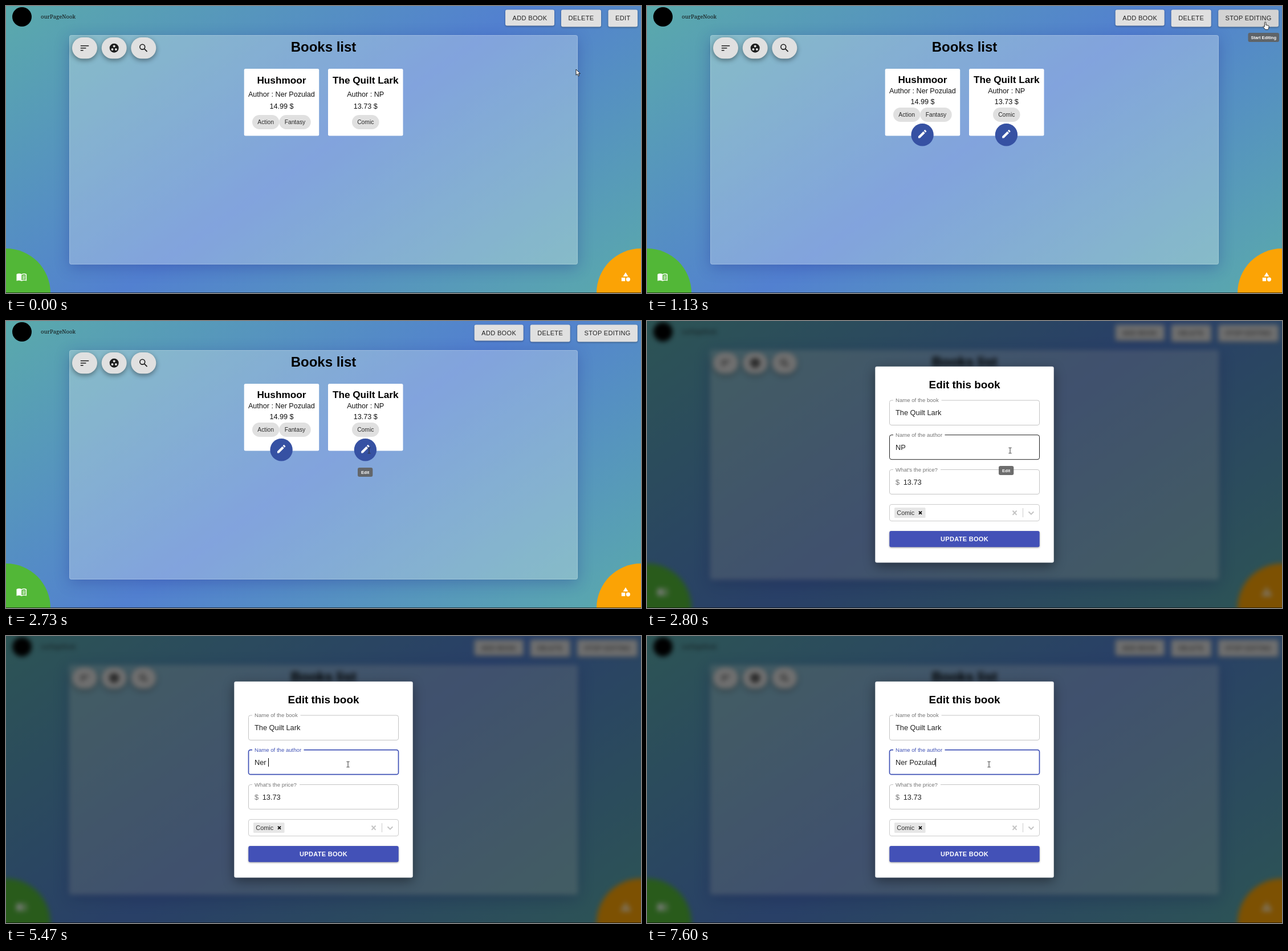
An HTML page for the animation above (8000 ms loop, 1114 by 503 pixels).

```html
<!DOCTYPE html>
<html lang="en">
<head>
<meta charset="utf-8">
<title>Book shelf</title>
<style>
html, body { margin: 0; width: 100%; height: 100%; overflow: hidden; }
#stage {
  position: relative; width: 1114px; height: 503px; overflow: hidden;
  background: linear-gradient(145deg, #5aaaab, #5280d0 50%, #5aaaab);
}
#page, #stage svg { position: absolute; left: 0; top: 0; width: 1114px; height: 503px; }
svg { overflow: visible; font-family: "Liberation Sans", Arial, sans-serif; }
text { white-space: pre; }
#panel {
  position: absolute; left: 111px; top: 50.5px; width: 892px; height: 402px; box-sizing: border-box;
  border: 1px solid rgba(255,255,255,.2); border-radius: 4px;
  background: rgba(255,255,255,.28); box-shadow: 0 6px 26px rgba(31,38,135,.3);
}
.raised { filter: drop-shadow(0 1.5px 1.5px rgba(0,0,0,.38)); }
.floating { filter: drop-shadow(0 3px 4px rgba(0,0,0,.4)); }
.sheet { filter: drop-shadow(0 6px 10px rgba(0,0,0,.4)); }
</style>
</head>
<body>
<div id="stage">
  <div id="page"><div id="panel"></div><svg id="shop"></svg></div>
  <svg id="front"></svg>
</div>
<script>
const NS = 'http://www.w3.org/2000/svg';
const LOOP = 8000, EDIT_AT = 1000, OPEN_AT = 2780, FOCUS_AT = 3470, SELECT_AT = 3800;
const BLUE = '#3f51b5';
const AUTHOR = 'Ner Pozulad', INITIALS = 'NP', BOOK = 'The Quilt Lark';
const byId = id => document.getElementById(id);

function el(parent, tag, attrs = {}, content) {
  const node = document.createElementNS(NS, tag);
  for (const key in attrs) node.setAttribute(key, attrs[key]);
  if (content !== undefined) node.textContent = content;
  parent.append(node);
  return node;
}
const group = (parent, attrs) => el(parent, 'g', attrs);
const rect = (parent, x, y, width, height, rx, fill, more) =>
  el(parent, 'rect', { x, y, width, height, rx, fill, ...more });
const circle = (parent, cx, cy, r, fill, more) => el(parent, 'circle', { cx, cy, r, fill, ...more });
const path = (parent, d, fill, more) => el(parent, 'path', { d, fill, ...more });
const line = (parent, d, stroke, width = 1) => path(parent, d, 'none', { stroke, 'stroke-width': width });
const label = (parent, x, y, size, content, more) =>
  el(parent, 'text', { x, y, 'font-size': size, fill: '#000', ...more }, content);
const centred = (parent, x, y, size, content, more) =>
  label(parent, x, y, size, content, { 'text-anchor': 'middle', ...more });
const bold = { 'font-weight': 700 };

// 24-unit icon grid centred on (x, y)
const icon = (parent, x, y, scale = .8) =>
  group(parent, { transform: `translate(${x} ${y}) scale(${scale}) translate(-12 -12)` });

function button(parent, x, y, w, h, content) {
  const face = rect(parent, x, y, w, h, 3, '#e0e0e0', { class: 'raised' });
  centred(parent, x + w / 2, 24.7, 11.05, content, { fill: '#212121', 'letter-spacing': .31 });
  return face;
}

function toolbar(parent, shift, last) {
  const g = group(parent);
  button(g, 876 - shift, 6.5, 86, 28, 'ADD BOOK');
  button(g, 974 - shift, 6.5, 70, 30, 'DELETE');
  return { g, last: button(g, 1056.5 - shift, 6.5, 51.5 + shift, 30, last) };
}

function tooltip(parent, x, y, w, content) {
  const g = group(parent);
  rect(g, x, y, w, 16, 3, 'rgba(97,97,97,.92)');
  centred(g, x + w / 2, y + 10.7, 7.5, content, { ...bold, fill: '#fff' });
  return g;
}

function card(parent, x, title, author, price, chips) {
  const mid = x + 65.7;
  rect(parent, x, 110, 131.5, 117.5, 2.5, '#fff');
  const name = centred(parent, mid, 0, 17.2, title, bold);
  const by = centred(parent, mid, 0, 12.6, 'Author : ' + author, { fill: '#111' });
  const cost = centred(parent, mid, 0, 12.6, price + ' $', { fill: '#111' });
  const tags = group(parent);
  for (const [left, w, content] of chips) {
    rect(tags, left, 0, w, 25, 12.5, '#e0e0e0');
    centred(tags, left + w / 2, 15.7, 10.3, content, { fill: '#2a2a2a' });
  }
  const pen = group(parent);
  circle(pen, mid - .3, 225.7, 19.7, '#3651a3');
  path(icon(pen, mid - .3, 224.3),
    'M3 17.25V21h3.75L17.81 9.94l-3.75-3.75zM20.71 7.04c.39-.39.39-1.02 0-1.41l-2.34-2.34c-.39-.39-1.02-.39-1.41 0l-1.83 1.83 3.75 3.75z', '#fff');
  return editing => {
    name.setAttribute('y', editing ? 134.5 : 136.3);
    by.setAttribute('y', editing ? 153.3 : 158.7);
    cost.setAttribute('y', editing ? 171.8 : 180.3);
    tags.setAttribute('transform', `translate(0 ${editing ? 178 : 191})`);
    show(pen, editing);
  };
}

function show(node, on) { node.style.display = on ? '' : 'none'; }

// Shop page
const shop = byId('shop');
circle(shop, 28, 19, 17, '#000');
label(shop, 61, 22.4, 9.5, 'ourPageNook', { 'font-family': '"Noto Serif", serif', fill: '#111' });
const idleBar = toolbar(shop, 0, 'EDIT');
const editBar = toolbar(shop, 54.3, 'STOP EDITING');
centred(shop, 557, 80.3, 24, 'Books list', bold);

for (const x of [116, 167.7, 219.3]) rect(shop, x, 55, 44, 37.3, 18.6, '#e0e0e0', { class: 'floating' });
path(icon(shop, 138, 73.7), 'M3 18h6v-2H3zM3 6v2h18V6zM3 13h12v-2H3z', '#1c1c1c');
const wheel = icon(shop, 189.7, 73.7);
circle(wheel, 12, 12, 10, '#1c1c1c');
for (const [x, y] of [[8, 15], [12, 8], [16, 15]]) circle(wheel, x, y, 2.5, '#e0e0e0');
const lens = icon(shop, 241.3, 73.7);
circle(lens, 9.5, 9.5, 5.5, 'none', { stroke: '#1c1c1c', 'stroke-width': 2 });
line(lens, 'M13.5 13.5L19.8 19.8', '#1c1c1c', 2.2);

const cards = [
  card(shop, 417.7, 'Hushmoor', AUTHOR, '14.99', [[432, 47.3, 'Action'], [479.2, 55.5, 'Fantasy']]),
  card(shop, 565, BOOK, INITIALS, '13.73', [[607, 47.5, 'Comic']])
];

circle(shop, 0, 503, 78, '#52b737');
circle(shop, 1114, 503, 78, '#fba305');
const book = icon(shop, 27.3, 474.7);
path(book, 'M12 6Q7 3 1 6V20.8Q7 18.5 12 21.5Q17 18.5 23 20.8V6Q17 3 12 6zM12 8Q17 5.3 21 7V18.5Q16 17.3 12 19.5z', '#fff', { 'fill-rule': 'evenodd' });
for (const y of [10, 12.7, 15.4]) line(book, `M14 ${y + .6}Q17 ${y - .8} 19.5 ${y - .2}`, '#fff', 1.4);
const shapes = icon(shop, 1087, 474.7);
path(shapes, 'M12 2L6.5 11h11zM3 13.5h8v8H3z', '#fff');
circle(shapes, 17.5, 17.5, 4.5, '#fff');

// Dialog
const front = byId('front');
const startTip = tooltip(front, 1054.5, 47, 54.5, 'Start Editing');
const dialog = group(front);
rect(dialog, 0, 0, 1114, 503, 0, 'rgba(0,0,0,.5)');
rect(dialog, 400.3, 79.7, 313.4, 343.8, 3, '#fff', { class: 'sheet' });
centred(dialog, 557, 117.5, 18.9, 'Edit this book', bold);

function field(y, h, title, notch) {
  const frame = rect(dialog, 425.5, y, 263, h, 3.5, 'none', { stroke: '#c4c4c4' });
  rect(dialog, 432, y - 2, notch, 4, 0, '#fff');
  return { frame, title: label(dialog, 436, y + 3, 9.6, title, { fill: '#757575' }) };
}
const value = (x, y, content, fill = '#212121') => label(dialog, x, y, 12.8, content, { fill });

field(139, 43.5, 'Name of the book', 84.5);
value(436, 165, BOOK);
const authorField = field(199.7, 43, 'Name of the author', 90.5);
field(260.5, 43, "What's the price?", 83);
value(436, 287, '$', '#777');
value(449.7, 287, '13.73');

const pick = rect(dialog, 436, 214, 18, 15, 0, '#3390ff');
const typed = value(436, 226, INITIALS);
const caret = rect(dialog, 0, 214, 1, 15, 0, '#000');

rect(dialog, 425.5, 321.5, 263, 29, 3.5, 'none', { stroke: '#ccc' });
rect(dialog, 434, 327, 54.5, 18, 1.5, '#e6e6e6');
label(dialog, 438.3, 340, 10.9, 'Comic', { fill: '#333' });
line(dialog, 'M477 333.7l5 5m0-5l-5 5', '#000', 1.7);
line(dialog, 'M641.5 332.5l7 7.4m0-7.4l-7 7.4', '#c4c4c4', 2);
line(dialog, 'M659.5 328v16', '#ccc');
line(dialog, 'M669.5 334.3l4.4 4.4 4.4-4.4', '#c4c4c4', 2);
rect(dialog, 425.3, 368, 263.4, 28.3, 3, '#4351b7', { class: 'raised' });
centred(dialog, 557, 386, 11, 'UPDATE BOOK', { ...bold, fill: '#fff', 'letter-spacing': .31 });

const editTip = tooltip(front, 617, 257, 26.3, 'Edit');
rect(front, 0, 502, 1114, 1, 0, 'rgba(0,0,0,.6)');

// Pointer
const pointer = group(front);
const outline = { stroke: '#111', 'stroke-width': .9, 'stroke-linejoin': 'round' };
const pointers = {
  arrow: path(pointer, 'M0 0V10.2L2.4 8.1 4 11.8 5.7 11 4.1 7.4H7.3z', '#fff', outline),
  hand: path(pointer, 'M-1.2 1a1.2 1.2 0 0 1 2.4 0V5l4 .9q1.4.3 1.3 1.9l-.5 3q-.2 1.3-1 2.2h-5q-1.2-1.6-3.4-4.3-.8-1.3.4-1.6.9 0 1.8 1z', '#fff', outline),
  beam: line(pointer, 'M-2.5-4.8H-.6L0-4.3.6-4.8H2.5M0-4.3V4.3M-2.5 4.8H-.6L0 4.3.6 4.8H2.5', '#333')
};

const ROUTE = [
  [70, 1000, 111], [230, 1010, 101], [480, 1060, 55], [640, 1081, 33], [780, 1085, 28],
  [1130, 1085, 28], [1270, 1035, 63], [1530, 908, 160], [1730, 805, 203], [1930, 717, 219],
  [2130, 660, 226], [2330, 637, 227], [2830, 637, 227], [3000, 625, 226], [3300, 600, 225]
];
const KEYS = [4730, 5130, 5200, 5470, 6400, 6730, 6930, 7200, 7400, 7470, 7600];

const clamp = v => Math.max(0, Math.min(1, v));
const ramp = (t, from, span) => clamp((t - from) / span);
const mix = (a, b, k) => a + (b - a) * k;

function place(t) {
  const i = ROUTE.findIndex(step => step[0] > t);
  if (i === 0) return ROUTE[0].slice(1);
  if (i < 0) return ROUTE[ROUTE.length - 1].slice(1);
  const [t0, x0, y0] = ROUTE[i - 1], [t1, x1, y1] = ROUTE[i];
  const k = (t - t0) / (t1 - t0);
  return [mix(x0, x1, k), mix(y0, y1, k)];
}

function kind(t) {
  if (t >= 2700) return 'beam';
  return (t >= 600 && t < 1190) || t >= 2160 ? 'hand' : 'arrow';
}

function drawAuthor(t) {
  const focus = ramp(t, FOCUS_AT, 200);
  const focused = t >= FOCUS_AT;
  authorField.frame.setAttribute('stroke', focused ? BLUE : '#212121');
  authorField.frame.setAttribute('stroke-width', focused ? 1.7 : 1);
  authorField.title.setAttribute('fill', `rgb(${mix(117, 63, focus)},${mix(117, 81, focus)},${mix(117, 181, focus)})`);

  const count = KEYS.filter(key => key <= t).length;
  const selected = t >= SELECT_AT && !count;
  typed.textContent = count ? AUTHOR.slice(0, count) : INITIALS;
  typed.setAttribute('fill', selected ? '#fff' : '#212121');
  show(pick, selected);

  const since = t - (count ? KEYS[count - 1] : FOCUS_AT);
  show(caret, focused && !selected && Math.floor(since / 530) % 2 === 0);
  caret.setAttribute('x', Math.round(436 + typed.getComputedTextLength()));
}

function draw(t) {
  const editing = t >= EDIT_AT, open = t >= OPEN_AT;
  show(idleBar.g, !editing);
  show(editBar.g, editing);
  const hover = ramp(t, 600, 250) * (1 - ramp(t, 1190, 250));
  const shade = Math.round(mix(224, 211, hover));
  for (const bar of [idleBar, editBar]) bar.last.setAttribute('fill', `rgb(${shade},${shade},${shade})`);
  cards.forEach(update => update(editing));

  startTip.style.opacity = ramp(t, 640, 200) * (1 - ramp(t, 1130, 200));
  editTip.style.opacity = ramp(t, 2300, 220) * (1 - ramp(t, 2870, 180));
  editTip.setAttribute('transform', `translate(0 ${open ? -3 : 0})`);

  byId('page').style.filter = open ? 'blur(4px)' : 'none';
  show(dialog, open);
  if (open) drawAuthor(t);

  const [x, y] = place(t), shape = kind(t);
  pointer.setAttribute('transform', `translate(${x} ${y})`);
  for (const name in pointers) show(pointers[name], name === shape);
}

const start = performance.now();
function tick() {
  draw((performance.now() - start) % LOOP);
  requestAnimationFrame(tick);
}
tick();
</script>
</body>
</html>
```
